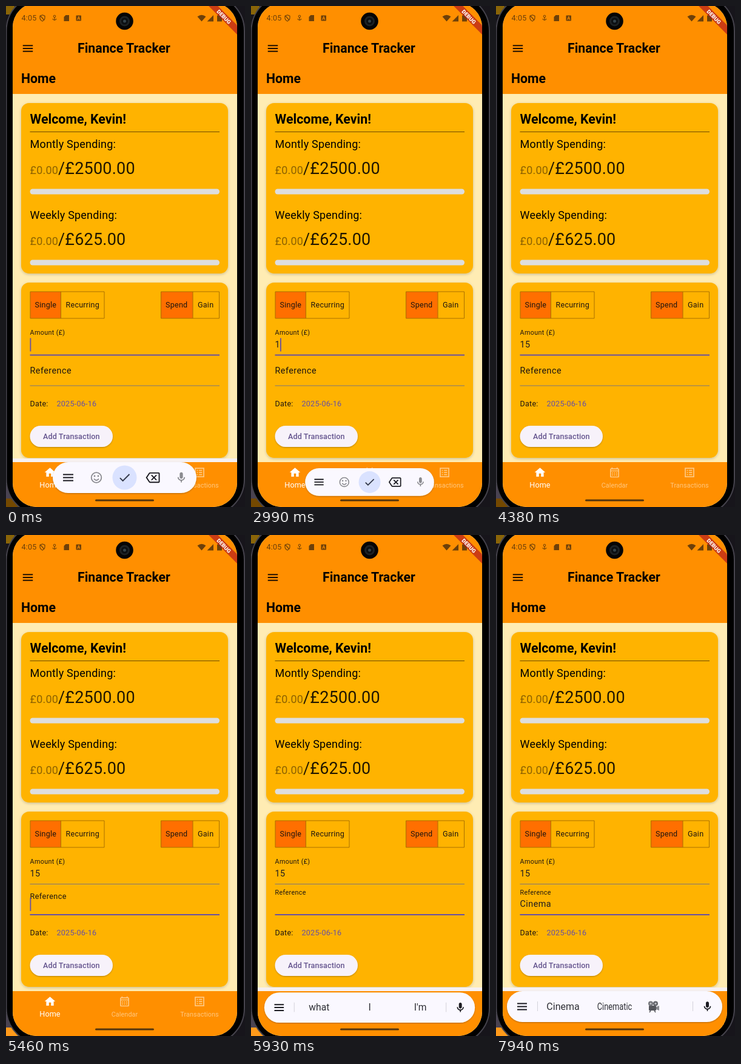
These frames come from a looping animation (394x826 px, 8 s). An HTML page:

```html
<!DOCTYPE html>
<html lang="en">
<head>
<meta charset="utf-8">
<title>Finance Tracker</title>
<style>
  html, body { margin: 0; width: 100%; height: 100%; overflow: hidden; background: #17151b; }
  svg { display: block; width: 394px; height: 826px; font-family: Roboto, sans-serif; }
  text { white-space: pre; }
  .title { font-size: 21.4px; font-weight: 700; }
  .head { font-size: 18px; letter-spacing: .2px; }
  .big { font-size: 27px; letter-spacing: .2px; fill: #211700; }
  .dim { fill: #8c6200; }
  .body { font-size: 12.6px; letter-spacing: .22px; fill: #1d1510; }
  .label { font-size: 10.8px; letter-spacing: .34px; fill: #1d1510; }
  .input { font-size: 14.4px; letter-spacing: .45px; fill: #1d1b20; }
  .nav { font-size: 10.8px; letter-spacing: .1px; text-anchor: middle; fill: #ffc780; }
  .word { font-size: 16px; text-anchor: middle; fill: #2f3036; }
</style>
</head>
<body>
<svg id="stage" viewBox="0 0 394 826" xmlns="http://www.w3.org/2000/svg"></svg>
<script>
const INK = '#1b1b21', PURPLE = '#6750a4', GREY = '#79747e';

const rect = (x, y, w, h, fill, r = 0, extra = '') =>
  `<rect x="${x}" y="${y}" width="${w}" height="${h}" rx="${r}" fill="${fill}" ${extra}/>`;
const text = (x, y, cls, str, extra = '') =>
  `<text x="${x}" y="${y}" class="${cls}" ${extra}>${str}</text>`;
const circle = (x, y, r, fill, extra = '') =>
  `<circle cx="${x}" cy="${y}" r="${r}" fill="${fill}" ${extra}/>`;
const path = (d, stroke, width = 1, extra = '') =>
  `<path d="${d}" fill="none" stroke="${stroke}" stroke-width="${width}" ${extra}/>`;
// Icon drawn on a 24-unit grid, centred on (x, y)
const icon = (d, x, y, size, fill) =>
  `<path d="${d}" fill="${fill}" fill-rule="evenodd" transform="translate(${x - size / 2} ${y - size / 2}) scale(${size / 24})"/>`;
const menu = (x, y, w, gap, color) =>
  path([-gap, 0, gap].map(o => `M${x - w / 2} ${y + o}h${w}`).join(''), color, 2);

const HOME = 'M10 20v-6h4v6h5v-8h3L12 3 2 12h3v8z';
const CALENDAR = 'M19 4h-1V2h-2v2H8V2H6v2H5a2 2 0 0 0-2 2v14a2 2 0 0 0 2 2h14a2 2 0 0 0 2-2V6a2 2 0 0 0-2-2zm0 16H5V10h14zm0-12H5V6h14z' +
  [7, 11, 15].map(x => `M${x} 12h2v2h-2zM${x} 16h2v2h-2z`).join('');
const LIST = 'M3 3h18v18H3zM5 5v14h14V5z' + [7, 11, 15].map(y => `M7 ${y}h2v2H7zM11 ${y}h6v2h-6z`).join('');
const MIC = 'M12 14c1.66 0 3-1.34 3-3V5c0-1.66-1.34-3-3-3S9 3.34 9 5v6c0 1.66 1.34 3 3 3zm5-3c0 2.76-2.24 5-5 5s-5-2.24-5-5H5c0 3.53 2.61 6.43 6 6.92V21h2v-3.08c3.39-.49 6-3.39 6-6.92z';
const BACKSPACE = 'M22 3H7c-.69 0-1.23.35-1.59.88L0 12l5.41 8.11c.36.53.9.89 1.59.89h15c1.1 0 2-.9 2-2V5c0-1.1-.9-2-2-2zm0 16H7.07L2.4 12l4.66-7H22zM10.41 17 14 13.41 17.59 17 19 15.59 15.41 12 19 8.41 17.59 7 14 10.59 10.41 7 9 8.41 12.59 12 9 15.59z';
const CHECK = 'M9 16.17 4.83 12l-1.42 1.41L9 19 21 7l-1.41-1.41z';

const statusBar = () => {
  const c = '#6d400a';
  return text(25.5, 24, 'body', '4:05', `style="fill:${c}"`) +
    path('M60 14.8l4 1.6v3.2q0 3.6-4 5.4q-4-1.8-4-5.4v-3.2zM57 16.5l6 7', c, 1.2) +
    circle(80, 17, 1.8, 'none', `stroke="${c}"`) + path('M80 19v5M76.8 21q3.2 5 6.4 0', c, 1.2) +
    `<path d="M98.5 15h5.5v10h-8.5v-7z" fill="${c}"/>` +
    rect(115.5, 15.5, 8.5, 9, c, 1) + path('M117.6 22.8l2.2-5.6 2.2 5.6M118.4 21h2.8', '#ff8f00', 1) +
    `<path d="M315.5 17.5q7-5.5 14 0l-7 8zM342 15v10.5h-10.500zM348 15.500h2v-1.500h4v1.500h2v10h-8z" fill="${c}"/>`;
};

const camera = circle(195.5, 25, 14.3, '#050505') + circle(195.5, 25, 8.5, '#1d2224') +
  circle(195.5, 25, 5.5, '#0b0f12') + circle(195.5, 25, 2.5, '#34434a');

const ribbon = `<g transform="translate(381 -4) rotate(45)">${rect(-45, 25.2, 90, 10.8, '#b71c1c', 0, 'opacity=".72"')}
  <text x="0" y="34" font-size="9" font-weight="900" fill="#fff" text-anchor="middle">DEBUG</text></g>`;

const toggle = (x, split, end, a, b, ax, bx) =>
  rect(x, 471, split - x, 44, '#ff6f00') +
  path(`M${x} 471H${end}V515H${x}ZM${split} 471v44`, '#a87000') +
  text(ax, 497, 'body', a) + text(bx, 497, 'body', b);

const summary = (y, name, limit) =>
  text(39.500, y, 'head', name) +
  text(39.500, y + 43, 'head dim', '£0.00') + text(86, y + 43, 'big', limit) +
  rect(39.500, y + 67.500, 312.500, 9, '#dedede', 4.500);

const page =
  rect(11, -5, 370, 831, '#ffecb3') + rect(11, -5, 370, 150, '#ff8f00') +
  statusBar() + menu(36, 70, 16.5, 4.7, '#201000') +
  text(118, 77, 'title', 'Finance Tracker', 'style="font-size:21.3px"') +
  text(25, 127, 'title', 'Home', 'style="font-size:21.3px"') +
  rect(25, 160, 341, 281, '#ffb300', 13, 'filter="url(#soft)"') +
  text(39.500, 194, 'title', 'Welcome, Kevin!') + path('M39.500 207.500H352', '#6b4b00', 1.200) +
  summary(234, 'Montly Spending:', '/£2500.00') +
  summary(351, 'Weekly Spending:', '/£625.00') +
  rect(25, 456, 341, 289, '#ffb300', 13, 'filter="url(#soft)"') +
  toggle(40, 90.500, 162, 'Single', 'Recurring', 47.500, 98.500) +
  toggle(255.500, 308, 351.500, 'Spend', 'Gain', 263, 316) +
  text(39.500, 542, 'label', 'Amount (£)') +
  '<text id="amount" class="input" x="39.500" y="563"></text><path id="amountLine"/>' +
  '<text id="refLabel" class="label" x="39.500">Reference</text>' +
  '<text id="ref" class="input" x="39.500" y="613"></text><path id="refLine"/>' +
  rect(0, 0, 1.8, 22, PURPLE, 0, 'id="caret"') +
  text(39.500, 660, 'body', 'Date:') +
  text(83.500, 660, 'body', '2025-06-16', `style="fill:${PURPLE}"`) +
  rect(39.500, 692, 136.500, 35, '#f7f2fa', 17.500, 'filter="url(#lift)"') +
  text(61, 714, 'body', 'Add Transaction', 'style="fill:#65558f;font-weight:500;letter-spacing:.1px"') +
  rect(11, 746, 370, 6, '#f7f1f1', 0, 'id="strip"') +
  rect(11, 752, 370, 74, '#ff8f00') +
  icon(HOME, 72.500, 769, 21, '#fff') +
  text(72.500, 794, 'nav', 'Home', 'style="font-size:12.6px;fill:#fff"') +
  icon(CALENDAR, 195.500, 769, 20, '#ffc780') + text(195.500, 794, 'nav', 'Calendar') +
  icon(LIST, 319, 769, 21, '#ffc780') + text(319, 794, 'nav', 'Transactions');

const numberBar = `<g id="numberBar">${rect(77, 752, 237, 51, '#faf8ff', 25.5, 'filter="url(#lift)"')}
  ${menu(102.5, 777.5, 17, 5, INK)}
  ${circle(149, 777.5, 8.300, 'none', 'stroke="#8b8b90" stroke-width="1.800"')}
  ${circle(146, 775, 1.400, '#8b8b90')}${circle(152, 775, 1.400, '#8b8b90')}
  ${path('M145 779.500q4 5 8 0', '#8b8b90', 1.800)}
  ${circle(195.5, 777.5, 20, '#dae2ff')}${icon(CHECK, 195.5, 777.500, 23, '#33384a')}
  ${icon(BACKSPACE, 242, 777.5, 23, INK)}${icon(MIC, 289, 777.5, 21, '#8b8b90')}</g>`;

const projector = `<g id="projector">${rect(252, 776, 12, 8, '#55565c', 1)}
  ${circle(255, 772.500, 4, '#77787e')}${circle(263, 772.500, 4, '#66676d')}
  ${circle(255, 772.500, 1.500, '#c4c5ca')}${circle(263, 772.500, 1.500, '#c4c5ca')}
  <path d="M264 778l5-2v8l-5-2z" fill="#8b8c92"/>${path('M255 784l-2 3M261 784l2 3', '#55565c', 1.500)}</g>`;

const wordBar = `<g id="wordBar">${rect(18, 752, 355, 51, '#faf8ff', 25.5, 'filter="url(#lift)"')}
  ${menu(43, 777.5, 16, 5, INK)}${path('M68.500 769v16M324.500 769v16', '#d3d2da')}
  ${[110.500, 195.500, 281].map((x, i) => `<g transform="translate(${x} 783)"><text id="word${i}" class="word"></text></g>`).join('')}
  ${projector}${icon(MIC, 348.5, 777.5, 20, INK)}</g>`;

document.getElementById('stage').innerHTML = `<defs>
  <clipPath id="screen"><rect x="11" y="-5" width="370" height="831" rx="40"/></clipPath>
  <filter id="soft" x="-10%" y="-10%" width="120%" height="120%"><feDropShadow dx="0" dy="1.500" stdDeviation="2" flood-opacity=".2"/></filter>
  <filter id="lift" x="-10%" y="-30%" width="120%" height="160%"><feDropShadow dx="0" dy="1" stdDeviation="1" flood-opacity=".3"/></filter>
  </defs>
  ${rect(0, 0, 394, 826, '#17151b')}${rect(0, 0, 14, 14, '#8a6508')}
  ${rect(0, 790, 30, 22, '#4a4352')}${rect(0, 812, 30, 14, '#744900', 0, 'id="corner"')}
  ${rect(.5, -19, 392.500, 859, '#000', 60, 'stroke="#45434c" stroke-width="2"')}
  <g clip-path="url(#screen)">${page}${ribbon}${numberBar}${wordBar}${rect(147, 813.5, 97, 3, '#55350d', 1.500)}</g>${camera}`;

const $ = id => document.getElementById(id);
const show = (id, on) => $(id).setAttribute('display', on ? 'inline' : 'none');
const set = (id, attrs) => Object.entries(attrs).forEach(([k, v]) => $(id).setAttribute(k, v));
const scaleBar = (id, s) => set(id, { transform: `translate(195.5 850) scale(${s}) translate(-195.5 -850)` });
const line = (id, y, focused) => set(id, {
  d: `M39.5 ${y}H352`, stroke: focused ? PURPLE : GREY, 'stroke-width': focused ? 1.8 : 1
});
const within = (t, spans) => spans.some(([a, b]) => t >= a && t < b);
// Last value whose start time has passed
const at = (t, steps) => steps.reduce((v, [start, next]) => t >= start ? next : v, '');

const amountKeys = [[2920, '1'], [3920, '15']];
const refKeys = [[6480, 'C'], [6750, 'Ci'], [6950, 'Cin'], [7080, 'Cine'], [7280, 'Cinem'], [7430, 'Cinema']];
const caretOn = [[0, 460], [990, 1470], [1930, 2460], [2920, 3460], [3920, 4380], [4930, 5920], [6480, 7940]];

function draw(t) {
  const inRef = t >= 5390, amount = at(t, amountKeys), ref = at(t, refKeys);
  $('amount').textContent = amount;
  $('ref').textContent = ref;
  line('amountLine', 575.5, !inRef);
  line('refLine', 626, inRef);

  const float = Math.min(1, Math.max(0, (t - 5390) / 150));
  set('refLabel', { y: 606 - 13 * float, style: `font-size:${14.4 - 3.6 * float}px;letter-spacing:${.45 - .11 * float}px` });

  const typed = $(inRef ? 'ref' : 'amount');
  set('caret', { x: 39.5 + (typed.textContent ? typed.getComputedTextLength() : 0), y: inRef ? 598 : 547.5 });
  show('caret', within(t, caretOn));

  const closing = Math.max(0, Math.floor((t - 2920) / 67));
  show('numberBar', t < 3260);
  scaleBar('numberBar', 1 - .103 * closing);

  const left = 1 - Math.min(1, Math.max(0, (t - 5660) / 340));
  show('wordBar', t >= 5660);
  scaleBar('wordBar', 1 - .53 * left * left);
  show('strip', t < 2990 || t >= 5590);
  set('corner', { fill: t < 5060 ? '#744900' : '#ff9a1a' });

  const full = t >= 7430;
  const words = t < 6550 ? ['what', 'I', "I'm"] : t < 6750 ? ['C', 'Can', 'Call'] : [ref, full ? 'Cinematic' : 'Cinema', ''];
  words.forEach((w, i) => $('word' + i).textContent = w);
  set('word1', { transform: full ? 'scale(.8 1)' : '' });
  show('projector', t >= 6750);
}

const start = performance.now();
function tick() {
  draw((performance.now() - start) % 8000);
  requestAnimationFrame(tick);
}
tick();
</script>
</body>
</html>
```
